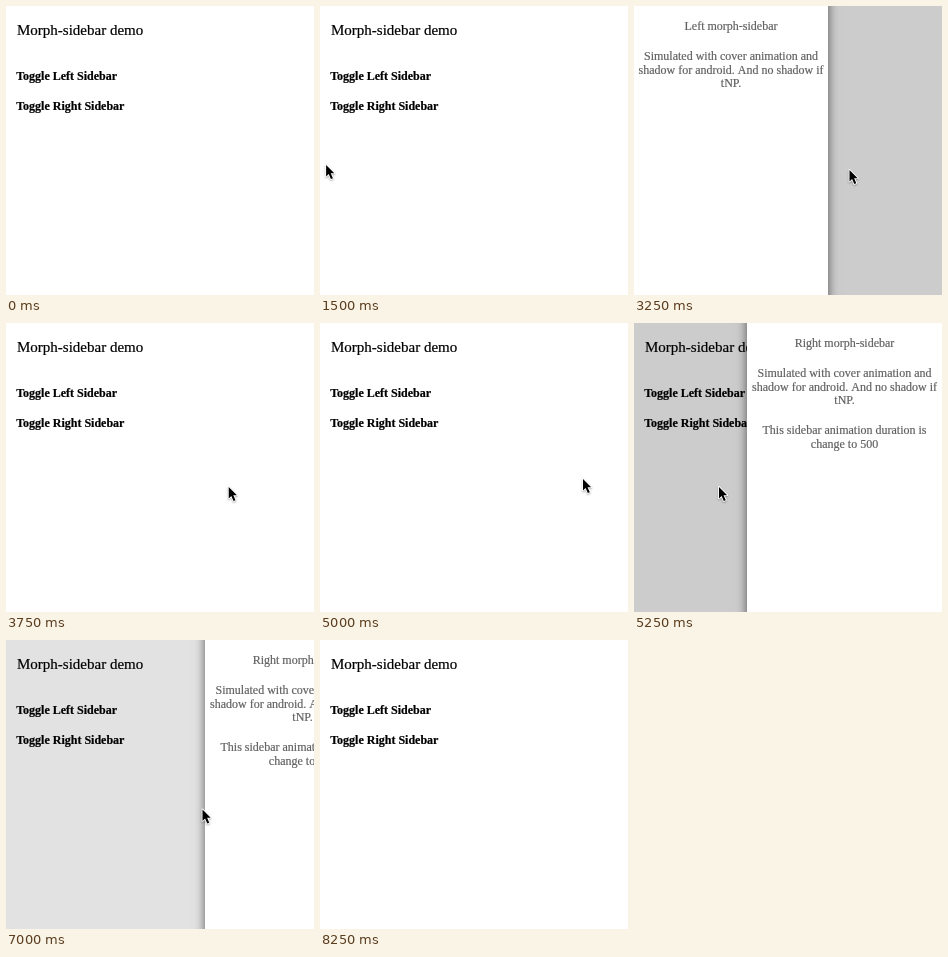
An HTML page with a canvas that plays this animation: 308x289 px, repeating every 9 s.

```html
<!DOCTYPE html>
<html lang="en">
<head>
<meta charset="utf-8">
<title>Morph-sidebar demo</title>
<style>
  html, body { margin: 0; width: 100%; height: 100%; overflow: hidden; background: #fff; }
  canvas { display: block; }
</style>
</head>
<body>
<canvas id="stage" width="308" height="289"></canvas>
<script>
const W = 308, H = 289, LOOP = 9000, TICK = 250;
const LINE = 13.5;
const SERIF = '"Liberation Serif", "Times New Roman", serif';
const ctx = document.getElementById('stage').getContext('2d');
const arrow = new Path2D('M0 0V11.4L2.6 9L4.8 14L6.8 13.2L4.6 8.2H8.2Z');

const easeOut = (u, power) => 1 - (1 - u) ** power;
const progress = (t, start, span) => Math.min(1, Math.max(0, (t - start) / span));

// Pointer gestures: time, x, y. Each leg slows towards its end.
const gestures = [
  [250, 103, 142], [500, 20, 178], [1250, 7, 159], [1750, 6, 159],
  [2000, 196.5, 157.5], [3250, 215.5, 164], [4000, 223, 164], [4750, 294, 157],
  [5000, 263, 156], [5250, 85, 164], [6750, 110.5, 169], [7000, 196.5, 169.5],
  [7750, 230, 170], [8000, 223, 164]
];
const pointerShown = t => (t >= 250 && t < 7250) || (t >= 7750 && t < 8250);

const note = [
  'Simulated with cover animation and',
  'shadow for android. And no shadow if',
  'tNP.'
];
const panels = [
  {
    side: 'left', width: 194,
    open: { start: 1750, span: 500 }, close: { start: 3500, span: 250 },
    blocks: [[24, ['Left morph-sidebar']], [54, note]]
  },
  {
    side: 'right', width: 195,
    open: { start: 5000, span: 250 }, close: { start: 6930, span: 278 },
    blocks: [
      [24, ['Right morph-sidebar']], [54, note],
      [111, ['This sidebar animation duration is', 'change to 500']]
    ]
  }
];

// A hairline stroke gives the slightly heavy look of smoothed text.
function text(str, x, y, font, color, align) {
  ctx.font = font + ' ' + SERIF;
  ctx.fillStyle = ctx.strokeStyle = color;
  ctx.lineWidth = 0.2;
  ctx.textAlign = align;
  ctx.fillText(str, x, y);
  ctx.strokeText(str, x, y);
}

function drawPage() {
  ctx.fillStyle = '#fff';
  ctx.fillRect(0, 0, W, H);
  text('Morph-sidebar demo', 11, 28.5, '15px', '#000', 'left');
  ['Left', 'Right'].forEach((side, i) =>
    text(`Toggle ${side} Sidebar`, 10.2, 73.6 + 30 * i, 'bold 12px', '#000', 'left'));
}

function drawPanel({ side, width, open, close, blocks }, t) {
  const ease = ({ start, span }) => easeOut(progress(t, start, span), 2);
  const amount = ease(open) - ease(close);
  if (amount <= 0) return;

  const shown = Math.round(width * amount);
  const x = side === 'left' ? shown - width : W - shown;
  ctx.fillStyle = `rgba(0, 0, 0, ${0.2 * amount})`;
  ctx.fillRect(0, 0, W, H);

  ctx.save();
  if (t >= open.start + open.span) {
    ctx.shadowColor = 'rgba(0, 0, 0, 0.6)';
    ctx.shadowBlur = 10;
  }
  ctx.fillStyle = '#fff';
  ctx.fillRect(x, -20, width, H + 40);
  ctx.restore();

  for (const [top, lines] of blocks) {
    lines.forEach((str, i) =>
      text(str, x + width / 2, top + LINE * i, '12px', '#606060', 'center'));
  }
}

function pointerAt(t) {
  const next = gestures.findIndex(([time]) => time > t);
  if (next < 0) return gestures[gestures.length - 1].slice(1);
  const [t0, x0, y0] = gestures[next - 1];
  const [t1, x1, y1] = gestures[next];
  const u = easeOut(progress(t, t0, t1 - t0), 3);
  return [x0 + (x1 - x0) * u, y0 + (y1 - y0) * u];
}

function drawPointer(t) {
  if (!pointerShown(t)) return;
  ctx.save();
  ctx.translate(...pointerAt(t));
  ctx.lineJoin = 'round';
  ctx.lineWidth = 1.8;
  ctx.strokeStyle = '#fff';
  ctx.shadowColor = 'rgba(0, 0, 0, 0.3)';
  ctx.shadowBlur = 2;
  ctx.shadowOffsetY = 1;
  ctx.stroke(arrow);
  ctx.shadowColor = 'transparent';
  ctx.fillStyle = '#000';
  ctx.fill(arrow);
  ctx.restore();
}

const begin = performance.now();

// The picture refreshes four times a second, so time moves in ticks.
function draw() {
  const elapsed = (performance.now() - begin) % LOOP;
  const t = Math.floor(elapsed / TICK) * TICK;
  drawPage();
  panels.forEach(panel => drawPanel(panel, t));
  drawPointer(t);
  requestAnimationFrame(draw);
}
draw();
</script>
</body>
</html>
```
